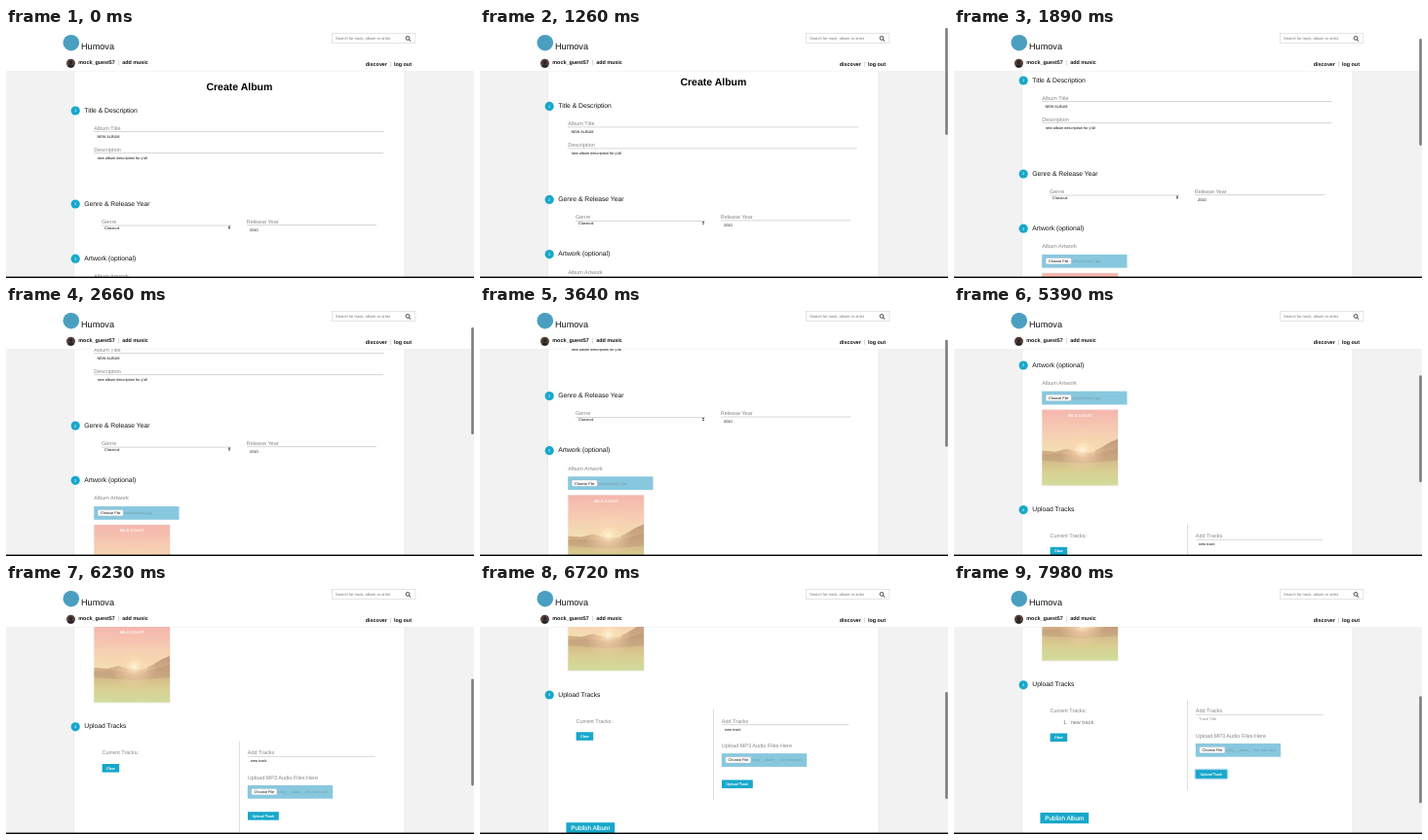
Write an HTML page that moves like this. It is 480 px wide and 257 px high and loops after 8000 ms.

```html
<!DOCTYPE html>
<html lang="en">
<head>
<meta charset="utf-8">
<title>Create Album</title>
<style>
  html, body { margin: 0; width: 100%; height: 100%; overflow: hidden; background: #fff; }
  svg { display: block; width: 100%; height: 100%; }
  text { font-family: "Liberation Sans", Arial, sans-serif; text-rendering: geometricPrecision; white-space: pre; }
</style>
</head>
<body>
<svg id="stage" viewBox="0 0 480 257" xmlns="http://www.w3.org/2000/svg">
  <defs>
    <linearGradient id="sky" x1="0" y1="0" x2="0" y2="1">
      <stop offset="0" stop-color="#f5b6ae"/>
      <stop offset=".3" stop-color="#f6cdb2"/>
      <stop offset=".55" stop-color="#f3dfb2"/>
      <stop offset="1" stop-color="#f0dca8"/>
    </linearGradient>
    <linearGradient id="field" x1="0" y1="0" x2="0" y2="1">
      <stop offset="0" stop-color="#c39a82"/>
      <stop offset=".35" stop-color="#d2b184"/>
      <stop offset=".7" stop-color="#d9cf91"/>
      <stop offset="1" stop-color="#cfdc9c"/>
    </linearGradient>
    <radialGradient id="sun">
      <stop offset="0" stop-color="#fff6dc" stop-opacity=".95"/>
      <stop offset=".35" stop-color="#fbd9b0" stop-opacity=".6"/>
      <stop offset="1" stop-color="#f7cfae" stop-opacity="0"/>
    </radialGradient>
  </defs>
  <rect width="480" height="257" fill="#f2f2f2"/>
  <rect x="69.7" y="44" width="339.2" height="214" fill="#fff" stroke="#e3e3e3" stroke-width=".6"/>
  <g id="page"></g>
  <g id="header"></g>
  <rect id="thumb" x="477.2" width="2.6" height="110" rx="1.3" fill="#7d7d7d"/>
  <rect y="255.6" width="480" height="1.4" fill="#000"/>
</svg>
<script>
const TEAL = '#17a8ca';
const LOOP = 8000, STEP = 70;
const FOCUS_AT = 7910, ADDED_AT = 7980;
const $ = id => document.getElementById(id);

const text = (x, y, size, str, fill = '#111', extra = '') =>
  `<text x="${x}" y="${y}" font-size="${size}" fill="${fill}" ${extra}>${str}</text>`;
const bold = (x, y, size, str, fill = '#111', extra = '') =>
  text(x, y, size, str, fill, `font-weight="700" ${extra}`);
const rect = (x, y, w, h, fill, extra = '') =>
  `<rect x="${x}" y="${y}" width="${w}" height="${h}" fill="${fill}" ${extra}/>`;
const line = (x1, y1, x2, y2, color = '#bdbdbd') =>
  `<path d="M${x1} ${y1}L${x2} ${y2}" stroke="${color}" stroke-width=".6"/>`;
const label = (x, y, str) => text(x, y, 5.5, str, '#858585');
const input = (x, y, str, fill) => text(x, y, 3.85, str, fill);

const section = (n, y, title) =>
  `<circle cx="71.2" cy="${y}" r="4.6" fill="${TEAL}"/>` +
  text(71.2, y + 1.4, 4, n, '#fff', 'text-anchor="middle"') +
  text(80.3, y + 1.6, 6.75, title);

const filePicker = (x, y, name) =>
  rect(x, y, 87.3, 13.8, '#88c8df') +
  rect(x + 4, y + 3.7, 26, 6.2, '#fff', 'rx="1" stroke="#aaa" stroke-width=".3"') +
  text(x + 6.8, y + 8.2, 3.85, 'Choose File') +
  text(x + 31, y + 8.2, 3.85, name, '#6f9fb0');

const button = (x, y, w, h, size, str) =>
  rect(x, y, w, h, TEAL) +
  text(x + w / 2, y + h / 2 + size * .36, size, str, '#fff',
    'text-anchor="middle" stroke="#fff" stroke-width=".12"');

const artwork = `<g transform="translate(90.5 283)">
  ${rect(-.7, -.7, 78.9, 79.2, '#eee')}
  ${rect(0, 0, 77.5, 77.5, 'url(#sky)')}
  <path d="M0 42L14 43 25 40 36 43 50 44 60 39 70 33 77.5 30V77.5H0Z" fill="url(#field)"/>
  <path d="M0 46L20 45 40 47 60 44 77.5 39V52L40 55 0 52Z" fill="#a98370" opacity=".3"/>
  <circle cx="41" cy="41" r="24" fill="url(#sun)"/>
  <path d="M33 43Q39 31 48 36T51 47" fill="none" stroke="#fff1d4" stroke-width=".8" opacity=".55"/>
  ${bold(38.7, 7, 4, 'MILD COAST', '#fff', 'text-anchor="middle" opacity=".85"')}
</g>`;

$('page').innerHTML =
  bold(239.4, 64, 10.5, 'Create Album', '#000', 'text-anchor="middle"') +
  section(1, 85, 'Title &amp; Description') +
  label(90.3, 104.9, 'Album Title') + line(90, 106.5, 388, 106.5) +
  input(93.5, 112.8, 'NEW ALBUM') +
  label(90.3, 126.9, 'Description') + line(90, 128.5, 387, 128.5) +
  input(93.7, 134.6, "new album description for y'all") +

  section(2, 181, 'Genre &amp; Release Year') +
  label(98, 200.9, 'Genre') + line(98, 203, 231, 203) +
  input(101, 206.5, 'Classical') +
  '<path d="M227.9 204.6l1.1-1.6 1.1 1.6zM227.9 205.3l1.1 1.6 1.1-1.6z" fill="#222"/>' +
  label(246.8, 200.9, 'Release Year') + line(247, 202.5, 380, 202.5) +
  input(250, 208.9, '2010') +

  section(3, 237.2, 'Artwork (optional)') +
  label(90.3, 257.3, 'Album Artwork') +
  filePicker(90.2, 263.8, 'yellowvalley2.jpg') +
  artwork +

  section(4, 385.8, 'Upload Tracks') +
  label(98.5, 414.4, 'Current Tracks:') +
  `<g id="track">${text(112, 426, 5.5, '1.  new track', '#707070')}</g>` +
  `<g id="clear">${button(98.6, 424, 17.6, 8.6, 3.7, 'Clear')}</g>` +
  line(239.5, 400.5, 239.5, 494, '#c8c8c8') +
  label(247.8, 414.4, 'Add Tracks') + line(248, 416.4, 378.5, 416.4) +
  `<g id="typed">${input(251, 422.4, 'new track')}</g>` +
  `<g id="hint">${input(251.3, 422.4, 'Track Title', '#8a8a8a')}</g>` +
  label(247.8, 439.6, 'Upload MP3 Audio Files Here') +
  filePicker(247.8, 445.9, 'song_-_dawn_-_the_lake.mp3') +
  `<g id="ring">${rect(247, 472.2, 33.8, 10.4, '#7cc4ee', 'rx="1" stroke="#b5dcf3" stroke-width=".9"')}</g>` +
  button(248, 473.2, 31.8, 8.5, 3.85, 'Upload Track') +
  button(88.4, 517, 49.8, 11.2, 6.35, 'Publish Album');

$('header').innerHTML =
  rect(0, 0, 480, 44, '#fff') +
  '<circle cx="66.8" cy="15.2" r="8.3" fill="#4a9fc0"/>' +
  text(77, 22.4, 9.15, 'Humova') +
  '<circle cx="66.5" cy="36.3" r="4.5" fill="#59403a"/>' +
  '<path d="M63.3 39.4a3.3 2.7 0 0 1 6.4 0a4.5 4.5 0 0 1-6.4 0z" fill="#26262b"/>' +
  '<circle cx="66.5" cy="35.3" r="1.9" fill="#26262b"/>' +
  bold(74.3, 37.3, 5.4, 'mock_guest57') +
  line(115.6, 33, 115.6, 38.5) +
  bold(119.2, 37.3, 5.4, 'add music') +
  rect(334.3, 5.4, 85.6, 10.2, '#fff', 'stroke="#d2d2d2" stroke-width=".6"') +
  text(338, 11.9, 4, 'Search for track, album or artist', '#777') +
  '<path d="M413.3 11.9l1.9 1.8" stroke="#222" stroke-width="1"/>' +
  '<circle cx="412" cy="10.4" r="1.9" fill="none" stroke="#222" stroke-width=".8"/>' +
  bold(368.8, 39.1, 5.4, 'discover') +
  line(394.6, 34.5, 394.6, 40) +
  bold(398, 39.1, 5.4, 'log out');

// Scroll keys: time, position, speed in px/ms
const scrollKeys = [
  [980, 0, 0], [1890, 31, .04], [2700, 58, 0], [2870, 58, 0],
  [3640, 88.5, .04], [4480, 113.6, 0], [4550, 113.6, 0],
  [5390, 176.2, .08], [6230, 239, .07], [7070, 282, 0]
];

function scrollAt(t) {
  const next = scrollKeys.findIndex(key => t < key[0]);
  if (next === 0) return 0;
  if (next < 0) return scrollKeys[scrollKeys.length - 1][1];
  const [t0, p0, v0] = scrollKeys[next - 1], [t1, p1, v1] = scrollKeys[next];
  const d = t1 - t0, u = (t - t0) / d, w = 1 - u;
  return w * w * ((1 + 2 * u) * p0 + u * d * v0) + u * u * ((3 - 2 * u) * p1 - w * d * v1);
}

const show = (id, on) => $(id).setAttribute('visibility', on ? 'visible' : 'hidden');

function render(ms) {
  const t = Math.floor(ms % LOOP / STEP) * STEP;
  const scroll = scrollAt(t), added = t >= ADDED_AT;
  $('page').setAttribute('transform', `translate(0 ${-scroll})`);
  $('thumb').setAttribute('y', scroll * .416 - 2);
  show('thumb', scroll > 0);
  show('ring', t >= FOCUS_AT);
  show('track', added);
  show('hint', added);
  show('typed', !added);
  $('clear').setAttribute('transform', `translate(0 ${added ? 11.5 : 0})`);
}

const start = performance.now();
function tick() {
  render(performance.now() - start);
  requestAnimationFrame(tick);
}
tick();
</script>
</body>
</html>
```
